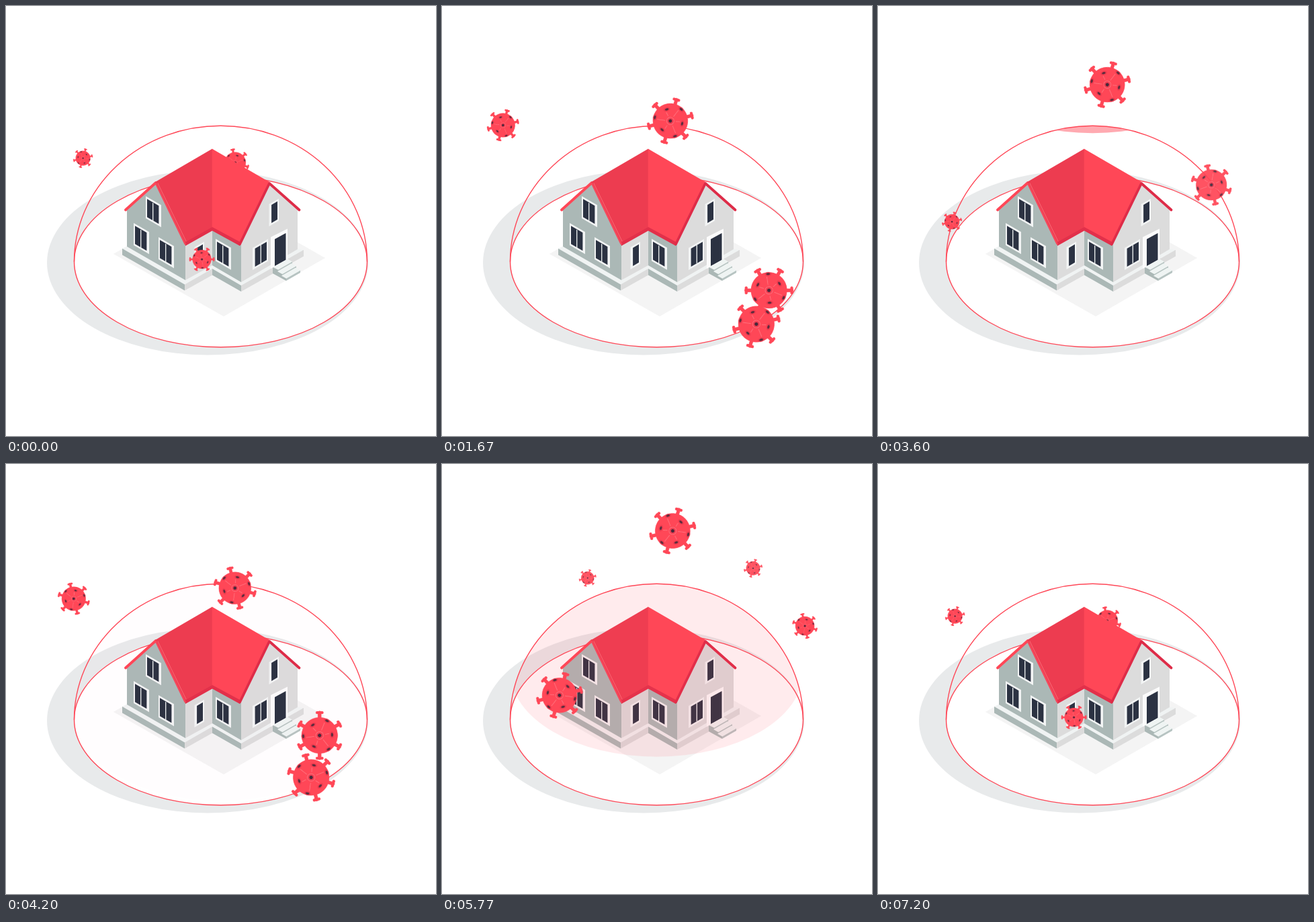
Recreate the animation shown at these times as an HTML page with a canvas. Size 640 by 640 pixels, loop 7230 ms.

```html
<!DOCTYPE html>
<html lang="en">
<head>
<meta charset="utf-8">
<title>Protected house</title>
<style>
html, body { margin: 0; height: 100%; overflow: hidden; background: #fff; }
canvas { display: block; width: 100vw; height: 100vh; }
</style>
</head>
<body>
<canvas id="stage" width="640" height="640"></canvas>
<script>
const stage = document.getElementById('stage').getContext('2d');
const RED = '#ff4757', DARK = '#2b3242', TAU = Math.PI * 2;
const LOOP = 7230, STEP = 40, CYCLE = 60;
const DOME = { x: 319.5, y: 380.5, rx: 218, ry: 127.3, rise: 202.3 };
let c = stage;

function poly(fill, ...p) {
  c.beginPath();
  for (let i = 0; i < p.length; i += 2) c.lineTo(p[i], p[i + 1]);
  c.closePath();
  c.fillStyle = fill;
  c.fill();
}
function line(color, width, ...p) {
  c.beginPath();
  for (let i = 0; i < p.length; i += 2) c.lineTo(p[i], p[i + 1]);
  c.strokeStyle = color;
  c.lineWidth = width;
  c.stroke();
}
function oval(fill, x, y, rx, ry = rx) {
  c.beginPath();
  c.ellipse(x, y, rx, ry, 0, 0, TAU);
  c.fillStyle = fill;
  c.fill();
}
const mix = (a, b, u) => a + (b - a) * u;
function smooth(from, to, v) {
  const u = Math.max(0, Math.min(1, (v - from) / (to - from)));
  return u * u * (3 - 2 * u);
}

// One virus is painted once, so that it can fade as a whole.
const SIZE = 144;
const virus = document.createElement('canvas');
virus.width = virus.height = SIZE;
function paintVirus() {
  c = virus.getContext('2d');
  c.translate(SIZE / 2, SIZE / 2);
  c.scale(2, 2);
  c.lineCap = 'round';
  for (let k = 0; k < 6; k++) {
    line(RED, 5, 22, 0, 32, 0);
    line(RED, 4, 32, -3.5, 32, 3.5);
    c.rotate(TAU / 6);
  }
  oval(RED, 0, 0, 25.5);
  c.rotate(27 * TAU / 360);
  for (let k = 0; k < 6; k++) {
    const r = k % 2 ? 23 : 17.5;
    line('#ff7883', 0.8, 8, -1, r - 4, -2);
    oval('#ee3c50', r, 0, 2.8, 4.8);
    oval('#5a2c3c', r, 0, 1.5, 2.7);
    c.rotate(TAU / 6);
  }
  oval('#ff7883', 0, 0, 5.6);
  oval('#f23f52', 0, 0, 4.8);
  oval('#48283a', 0, 0, 2.5);
  c = stage;
}

// A flight eases along a curve from p to q, bent towards b; its size changes late.
const flight = (start, end, p, b, q, r0 = 36, r1 = 12, turn = 46) =>
  ({ start, end, p, b, q, r0, r1, turn });
const hidden = flight(53, 70, [300, 270], [371, 185], [360, 290], 21, 12, 19);
const flights = [
  flight(1.6, 27, [512, 163], [500, 170], [460, 154], 37),
  flight(1.6, 27, [132, 199], [165, 165], [221, 170], 24),
  flight(10, 33.2, [88, 427], [276, 347], [92, 318]),
  flight(15.5, 33, [550, 228], [560, 234], [485, 272], 19, 34, 18),
  flight(19.5, 59.5, [344, 95], [334, 160], [346, 222], 35),
  flight(31, 58.4, [538, 465], [400, 500], [482, 405]),
  flight(37, 64.8, [82, 157], [137, 285], [111, 217], 24),
  flight(37, 65.4, [500, 440], [422, 331], [262, 386], 36, 12, 0)
];

function fly({ start, end, p, b, q, r0, r1, turn }, frame) {
  const f = frame < start ? frame + CYCLE : frame;
  if (f <= start || f >= end) return;
  const u = (f - start) / (end - start), s = smooth(0, 1, u);
  const [x, y] = [0, 1].map(i => mix(mix(p[i], b[i], s), mix(b[i], q[i], s), s));
  const side = mix(r0, r1, smooth(0.55, 0.95, u)) / 34 * SIZE / 2;
  c.save();
  c.globalAlpha = Math.min(1, (f - start) / 3.2, (end - f) / 3.2);
  c.translate(x, y);
  c.rotate((turn + f * 10) * TAU / 360);
  c.drawImage(virus, -side / 2, -side / 2, side, side);
  c.restore();
}

function ground() {
  const { x, y, rx, ry, rise } = DOME;
  oval('#e8eaeb', 300, 382, 239, 137.5);
  oval('#fff', x, y, rx, ry);
  poly('#f4f4f4', 160, 369, 324, 462, 475, 375, 311, 282);
  c.strokeStyle = RED;
  c.lineWidth = 1.4;
  c.beginPath();
  c.ellipse(x, y, rx, ry, 0, 0, TAU);
  c.stroke();
  c.beginPath();
  c.ellipse(x, y, rx, rise, 0, Math.PI, TAU);
  c.stroke();
}

// Upright parallelogram on an isometric wall; s is the slope of the wall.
const pane = (fill, x, y, w, h, s) =>
  poly(fill, x, y, x + w, y + w * s, x + w, y + w * s + h, x, y + h);

// The frame is deeper on the side that faces away from the viewer.
function win(x, y, w, side) {
  const s = side * 0.577, a = side > 0 ? 2 : 3.6, inner = w - 5.6;
  pane('#f2f4f4', x, y, w, 33, s);
  pane(DARK, x + a, y + a * s + 3, inner, 27, s);
  if (w > 20) pane('#e4e8e8', x + a + inner / 2 - 0.7, y + s * w / 2 + 3, 1.4, 27, s);
}

function house() {
  const shade = '#abb8b6', light = '#dcdcdc', trim = '#f0f3f3';
  // walls
  poly(shade, 180, 304, 223, 265, 267, 353, 267, 412, 180, 362);
  poly(light, 267, 355, 307, 332, 307, 391, 267, 412);
  poly(shade, 307, 332, 350, 355, 350, 414, 307, 390);
  poly(light, 350, 352, 392, 264, 434, 302, 434, 365, 350, 414);
  // plinth
  poly(trim, 173, 361, 180, 358, 267, 408, 307, 386, 350, 411, 434, 362, 443, 363, 350, 417, 307, 392, 266, 415);
  poly(shade, 173, 361, 266, 414.5, 266, 423.5, 173, 370.5);
  poly(light, 266, 414.5, 307, 391, 307, 400.5, 266, 423.5);
  poly(shade, 307, 391, 350, 416, 350, 425, 307, 400.5);
  poly(light, 350, 416, 443, 363, 443, 372.5, 350, 425);

  win(208, 283, 23, 1);
  win(190, 323, 23, 1);
  win(227, 344, 23, 1);
  win(312, 346.5, 23, 1);
  win(280.5, 359, 14.5, -1);
  win(391.5, 295, 14.5, -1);
  win(367, 360, 23, -1);

  // door and steps
  pane('#fbfbfb', 394, 344, 25, 47, -0.5);
  pane(DARK, 400, 347, 16.5, 40, -0.55);
  poly(shade, 397, 389, 406, 393, 411, 398, 417, 405, 417, 409, 397, 398);
  for (let k = 0; k < 3; k++) {
    const x = 398 + 6 * k, y = 388.5 + 6.5 * k;
    poly('#b7c4c2', x + 7, y + 4, x + 28, y - 8, x + 28, y - 4.5, x + 7, y + 7.5);
    poly('#eff4f3', x, y, x + 21, y - 12, x + 28, y - 8, x + 7, y + 4);
  }

  // roof
  c.lineCap = c.lineJoin = 'round';
  line(RED, 4, 178, 303.5, 223, 263);
  poly('#ed3c50', 307, 212.5, 222, 262, 266, 353, 307, 332);
  poly(RED, 306.7, 212.5, 392, 262, 348, 353, 306.7, 332);
  poly('#e2304a', 266, 352, 307, 329, 348, 351, 348, 357, 307, 334.5, 267, 357);
  line('#f5485b', 2.5, 223, 264, 266.5, 354);
  line('#ff7a85', 0.7, 226, 264, 268, 350);
  line('#de2c48', 3.8, 348, 354.5, 392, 264, 436.5, 303.5);
}

// A tint sweeps down the dome four times per loop, fading as it slows.
function shield(t) {
  const period = 1794, life = (t % period) / 710;
  if (t >= 4 * period || life <= 0 || life >= 1) return;
  const { x, y, rx, ry, rise } = DOME, left = (1 - life) ** 2;
  c.save();
  c.beginPath();
  c.ellipse(x, y, rx, rise, 0, Math.PI, TAU);
  c.ellipse(x, y, rx, ry, 0, 0, Math.PI);
  c.clip();
  c.globalAlpha = 0.48 * left;
  c.fillStyle = RED;
  c.beginPath();
  c.ellipse(x, y - (rise + ry) * left, rx, ry, 0, 0, Math.PI);
  c.lineTo(x - rx, -200);
  c.lineTo(x + rx, -200);
  c.fill();
  c.restore();
}

function draw(now) {
  const t = Math.floor((now % LOOP) / STEP + 0.3) * STEP;
  const frame = (t / STEP) % CYCLE;
  c.fillStyle = '#fff';
  c.fillRect(0, 0, 640, 640);
  ground();
  fly(hidden, frame);
  house();
  shield(t);
  for (const f of flights) fly(f, frame);
}

paintVirus();
stage.imageSmoothingQuality = 'high';
const begin = performance.now();
function tick() {
  draw(performance.now() - begin);
  requestAnimationFrame(tick);
}
tick();
</script>
</body>
</html>
```
